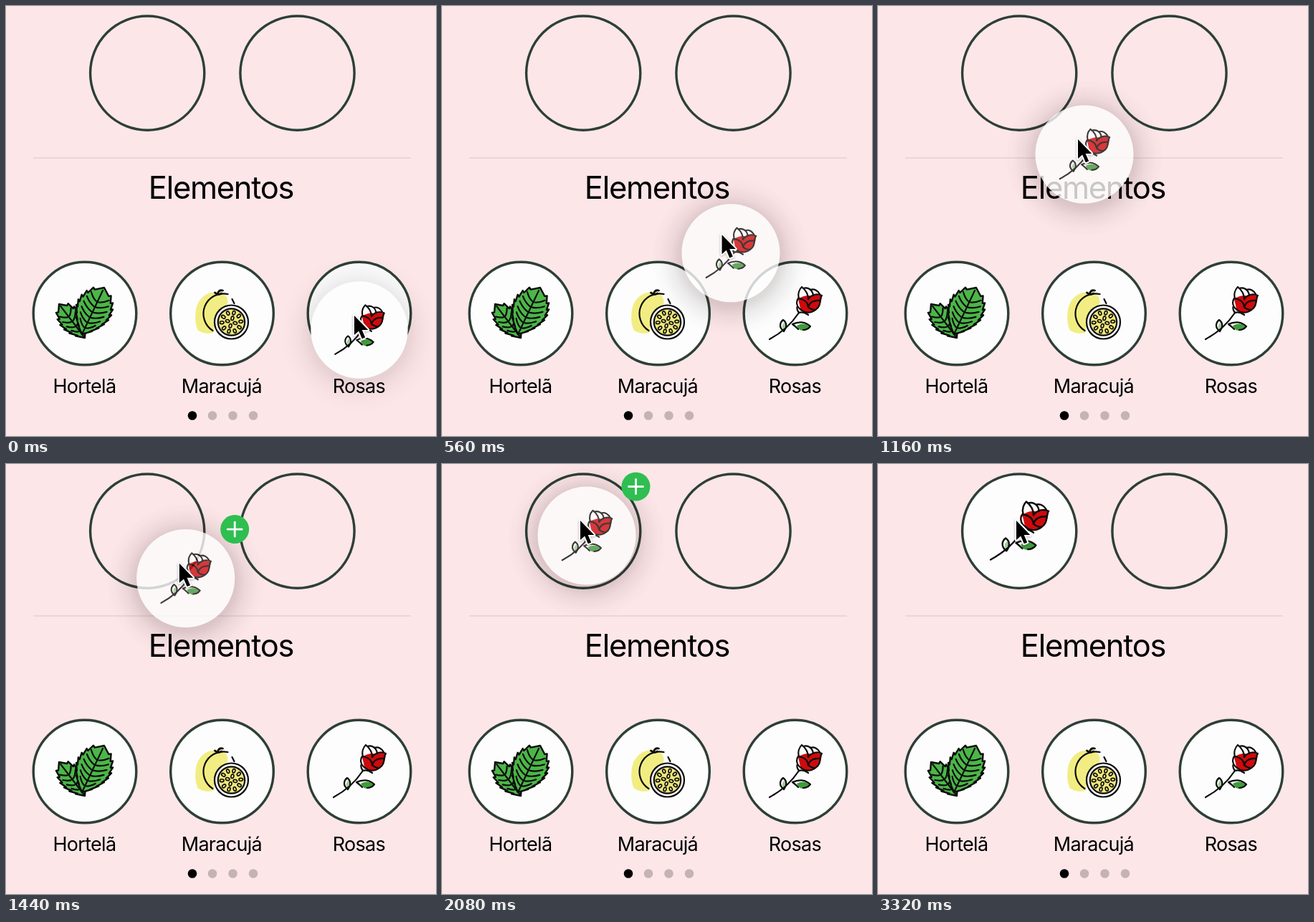
Write an HTML page that moves like this. It is 600x600 px and loops after 3400 ms.

```html
<!DOCTYPE html>
<html lang="pt">
<head>
<meta charset="utf-8">
<title>Elementos</title>
<style>
  html, body { margin: 0; width: 100%; height: 100%; overflow: hidden; background: #fce6e8; }
  svg { display: block; width: 100vw; height: 100vh; }
  text { font-family: Inter, Roboto, sans-serif; font-optical-sizing: none; text-anchor: middle; }
  .title { font-size: 43.5px; letter-spacing: -0.03em; }
  .label { font-size: 27px; letter-spacing: -0.026em; }
  .ring { fill: none; stroke: #2d3f37; stroke-width: 3.4; }
  .ink { fill: none; stroke: #0b0b0b; stroke-width: 2.2; stroke-linecap: round; stroke-linejoin: round; }
</style>
</head>
<body>
<svg viewBox="0 0 600 600">
  <defs>
    <radialGradient id="shade">
      <stop offset=".5" stop-color="#20080c" stop-opacity=".22"/>
      <stop offset=".62" stop-color="#20080c" stop-opacity=".18"/>
      <stop offset=".74" stop-color="#20080c" stop-opacity=".085"/>
      <stop offset=".87" stop-color="#20080c" stop-opacity=".028"/>
      <stop offset="1" stop-color="#20080c" stop-opacity="0"/>
    </radialGradient>

    <g id="rose">
      <path fill="#cf0a0c" d="M4-20C10-25 19-26 24-24C28-27 33-26 37-24C36-16 35-9 28-4C21 0 11-1 7-7Z"/>
      <path fill="#3f9b3c" d="M2 17C9 13 16 14 21 18C17 24 9 26 4 21Z"/>
      <path fill="#9ccf94" d="M-17 22C-20 18-17 14-15 13C-13 16-14 19-17 22Z"/>
      <g class="ink">
        <path d="M-36 36C-21 28-7 17 5-1"/>
        <path d="M-16 25C-24 19-21 12-17 9C-11 13-12 20-16 25"/>
        <path d="M-4 15C4 11 14 11 21 18C18 22 14 23 11 23M-4 15C-1 17 2 20 4 22"/>
        <path d="M8-5C1-10 1-17 4-21C12-20 17-17 18-9"/>
        <path d="M5-21C3-28 6-34 9-37C14-33 18-28 18-20"/>
        <path d="M11-35C18-37 24-33 25-25M21-33C27-35 32-31 34-27"/>
        <path d="M18-20C23-27 31-28 37-25C33-20 37-10 28-5"/>
        <path d="M8-5C14 0 22 0 28-5M18-9C20-16 27-19 34-18M18-9C21-6 25-5 28-5"/>
        <path d="M5-1C2-5 2-8 3-10M5-1C10-3 14-1 18 2"/>
      </g>
    </g>

    <g id="mint"></g>
    <g id="fruit">
      <path fill="#f2ed82" d="M-37 0C-36-20-22-31-6-30C4-29 9-22 8-14L-9 8L-12 27C-20 29-30 27-34 23C-37 16-38 8-37 0Z"/>
      <g class="ink">
        <path d="M-13 24A28 28 0 0 1 8-27M14-20L17-14"/>
        <path d="M-6-28C-5-31-3-33 1-32M-10-29C-7-26-3-26-1-28" stroke-width="2.8"/>
      </g>
      <circle cx="13" cy="12" r="23.5" class="ink" style="fill:#fdfdfd"/>
      <circle cx="13" cy="12" r="18.7" class="ink" style="fill:#eee67c"/>
      <g id="seeds" class="ink" style="stroke-width:1.6"></g>
    </g>
  </defs>

  <rect width="600" height="600" fill="#fce6e8"/>
  <g id="filled">
    <circle cx="197.2" cy="93.6" r="79.6" fill="#fdfdfd"/>
    <use href="#rose" transform="translate(197 93.5) scale(1.11)"/>
  </g>
  <circle class="ring" cx="197.2" cy="93.6" r="79.6"/>
  <circle class="ring" cx="406.5" cy="93.6" r="79.6"/>
  <path d="M38 212H565" stroke="#e4d0d3" stroke-width="1.6"/>
  <text class="title" x="300" y="269">Elementos</text>
  <g id="shelf"></g>

  <g id="disc">
    <circle id="shadow" cy="5" r="118" fill="url(#shade)"/>
    <circle r="72" fill="#fdfdfd"/>
    <use href="#rose"/>
  </g>
  <g id="badge">
    <circle r="20" fill="#2fbe50"/>
    <path d="M-10 0H10M0-10V10" stroke="#fff" stroke-width="2.8" stroke-linecap="round"/>
  </g>
  <path id="cursor" d="M0 0V27L6.2 21.6L10.8 32.3L15.2 30.4L10.7 19.9H19.3Z"
    fill="#000" stroke="#fff" stroke-width="4" stroke-linejoin="round" paint-order="stroke"
    style="filter:drop-shadow(0 1.5px 1.5px rgba(0,0,0,.28))"/>
</svg>
<script>
const LOOP = 3400, STEP = 40, LAST = 3320;
const DROP = 2200, GONE = 2640;
const $ = id => document.getElementById(id);
const clamp = x => Math.max(0, Math.min(1, x));
const ramp = (t, a, b) => clamp((t - a) / (b - a));

// Oval leaf along an axis from tip to base, with small teeth and slanted side veins.
function leaf([tx, ty], [bx, by], half, teeth) {
  const dx = bx - tx, dy = by - ty, len = Math.hypot(dx, dy);
  const at = (u, w) => `${(tx + dx * u - dy / len * w).toFixed(1)} ${(ty + dy * u + dx / len * w).toFixed(1)}`;
  const width = u => half * Math.pow(Math.sin(Math.PI * Math.pow(u, 0.9)), 0.8);
  const side = s => {
    const points = [];
    for (let i = 1; i <= teeth; i++) {
      const u = i / (teeth + 1), w = width(u);
      points.push(at(u, s * (w - 1.2)), at(u - 0.025, s * (w + 1.6)));
    }
    return points;
  };
  const edge = [at(0, 0), ...side(1), at(1, 0), ...side(-1).reverse()].join('L');
  let veins = `M${at(0.06, 0)}L${at(1, 0)}`;
  for (let i = 1; i < teeth - 1; i++) {
    const u = (i + 1) / (teeth + 1), w = width(u) * 0.74;
    for (const s of [-1, 1])
      veins += `M${at(u + 0.08, s * 2)}Q${at(u + 0.05, s * w * 0.6)} ${at(u - 0.04, s * w)}`;
  }
  return `<path d="M${edge}Z" class="ink" style="fill:#4cb648;stroke-width:2.4"/>
    <path d="${veins}" class="ink"/>`;
}
$('mint').innerHTML = leaf([-36, -13], [0, 34], 15, 6) + leaf([27, -36], [-4, 29], 24, 8);

let seeds = '';
[[4, 5.5], [10, 13.3]].forEach(([n, r]) => {
  for (let i = 0; i < n; i++)
    seeds += `<ellipse rx="1.9" ry="2.8" transform="translate(13 12) rotate(${360 * i / n + 15}) translate(0 ${-r})"/>`;
});
$('seeds').innerHTML = seeds;

const items = [['mint', 'Hortelã', 110], ['fruit', 'Maracujá', 301.5], ['rose', 'Rosas', 493]];
$('shelf').innerHTML = items.map(([icon, name, x]) =>
  `<circle cx="${x}" cy="429" r="71.8" fill="#fdfdfd"/><circle class="ring" cx="${x}" cy="429" r="71.8"/>
   <use href="#${icon}" x="${x}" y="429"/><text class="label" x="${x - 0.6}" y="540">${name}</text>`).join('') +
  [260, 288, 316.5, 345].map((x, i) =>
    `<circle cx="${x}" cy="571.5" r="6.3" fill="${i ? '#c4b3b5' : '#000'}"/>`).join('');

// Time, x, y
const pointer = [[0, 486, 432], [320, 444, 389], [800, 336, 248], [1160, 279, 186], [1720, 209, 96], [1960, 193, 79]];
const grip = [[0, 7, 20], [320, 35, 47], [520, 14, 27], [800, 11, 24.5], [1160, 9, 21], [1720, 9, 21]];

// Smooth curve through timed points, at rest at both ends.
function track(keys, t) {
  const end = keys.length - 1;
  if (t >= keys[end][0]) return keys[end].slice(1);
  let i = 0;
  while (t >= keys[i + 1][0]) i++;
  const a = keys[i], b = keys[i + 1], span = b[0] - a[0], u = (t - a[0]) / span;
  const slope = (k, c) => k === 0 || k === end ? 0 :
    (keys[k + 1][c] - keys[k - 1][c]) / (keys[k + 1][0] - keys[k - 1][0]);
  return [1, 2].map(c => {
    const u2 = u * u, u3 = u2 * u;
    return a[c] * (2 * u3 - 3 * u2 + 1) + b[c] * (3 * u2 - 2 * u3) +
      span * (slope(i, c) * (u3 - 2 * u2 + u) + slope(i + 1, c) * (u3 - u2));
  });
}

const place = (id, x, y, s = 1) => $(id).setAttribute('transform', `translate(${x} ${y}) scale(${s})`);
const show = (id, on) => { $(id).style.display = on ? '' : 'none'; };

function draw(t) {
  const [cx, cy] = track(pointer, t), [gx, gy] = track(grip, t);
  const lift = ramp(t, 0, 240), drop = ramp(t, DROP, GONE);
  const x = cx + gx, y = cy + gy;
  place('cursor', cx, cy);
  place('disc', x + (197 - x) * drop, y + (93.5 - y) * drop, (0.94 + 0.012 * lift) * (1 - 0.73 * drop));
  $('disc').style.opacity = (1 - 0.21 * lift) * Math.pow(1 - drop, 2);
  $('shadow').style.opacity = 0.5 + 0.5 * lift;
  place('badge', x + 68.5, y - 68.5, ramp(t, 1280, 1440));
  show('badge', t > 1280 && t < DROP);
  show('disc', t < GONE);
  show('filled', t >= DROP);
}

const start = performance.now();
function tick() {
  const t = (performance.now() - start) % LOOP;
  draw(Math.min(LAST, Math.floor(t / STEP) * STEP));
  requestAnimationFrame(tick);
}
tick();
</script>
</body>
</html>
```
